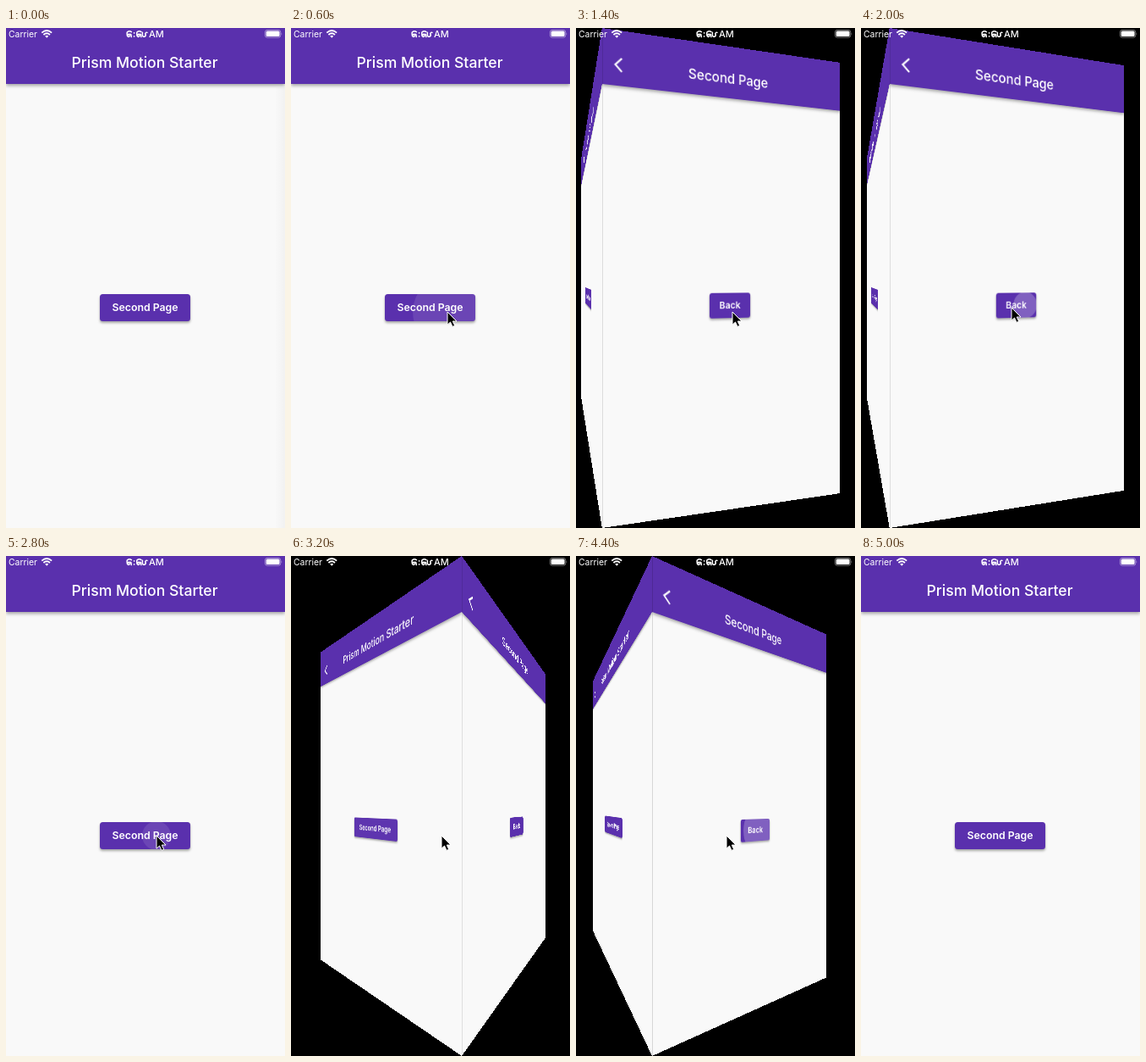
These frames come from a looping animation (330x590 px, 5400 ms). An HTML page:

```html
<!DOCTYPE html>
<html lang="en">
<head>
<meta charset="utf-8">
<title>Page rotation</title>
<style>
html, body { margin: 0; width: 100%; height: 100%; overflow: hidden; background: #000; }
#stage { position: relative; width: 330px; height: 590px; overflow: hidden; background: #000;
  font-family: Inter, Roboto, sans-serif; color: #fff; }
.page { position: absolute; inset: 0; overflow: hidden; background: #f9f9f9; }
#first { transform-origin: 100% 50%; }
#second { transform-origin: 0 50%; }
#second::after { content: ""; position: absolute; inset: 0 auto 0 0; width: 1px; background: rgba(0,0,0,.14); }
.bar { position: absolute; left: 0; top: 0; width: 330px; height: 66px; background: #5a30ad;
  box-shadow: 0 2px 4px rgba(0,0,0,.36); }
.bar span { position: absolute; left: 0; width: 328px; top: 30px; line-height: 22px;
  text-align: center; font-size: 17.6px; font-weight: 500; white-space: nowrap; }
.bar svg { position: absolute; left: 13px; top: 31px; }
.button { position: absolute; top: 313.5px; height: 32px; border-radius: 3.5px; background: #5a30ad;
  box-shadow: 0 2px 3px rgba(0,0,0,.34); overflow: visible; text-align: center;
  font-size: 12.3px; font-weight: 600; line-height: 31.5px; white-space: nowrap; }
.clip { position: absolute; inset: 0; border-radius: inherit; overflow: hidden; }
.ripple { position: absolute; border-radius: 50%; background: #fff; transform: translate(-50%, -50%); }
#first .button { left: 111px; width: 107px; }
#second .button { left: 137px; width: 56.5px; }
#edge { position: absolute; right: 0; top: 70px; bottom: 0; width: 12px;
  background: linear-gradient(90deg, transparent, rgba(0,0,0,.03)); }
#overlay { position: absolute; left: 0; top: 0; }
</style>
</head>
<body>
<div id="stage">
  <div class="page" id="first">
    <div class="bar"><svg class="chevron" width="14" height="20"><path d="M11 2L3 10L11 18" fill="none" stroke="#fff" stroke-width="2.2"/></svg><span>Prism Motion Starter</span></div>
    <div class="button"><div class="clip"><div class="ripple"></div></div>Second Page</div>
    <div id="edge"></div>
  </div>
  <div class="page" id="second">
    <div class="bar"><svg width="14" height="20"><path d="M11 2L3 10L11 18" fill="none" stroke="#fff" stroke-width="2.2"/></svg><span>Second Page</span></div>
    <div class="button"><div class="clip"><div class="ripple"></div></div>Back</div>
  </div>
  <svg id="overlay" width="330" height="590" fill="#fff" font-family="Inter, Roboto, sans-serif">
    <text x="3" y="11" font-size="10.4">Carrier</text>
    <g fill="none" stroke="#fff" stroke-width="1.9">
      <path d="M42.3 5.6Q48.2 .6 54.1 5.6M44.4 7.9Q48.2 4.8 52 7.9"/>
    </g>
    <path d="M46.2 9.6Q48.2 8 50.2 9.6L48.2 11.7Z"/>
    <g fill="none" stroke="#fff" stroke-width="1.5" stroke-linecap="round">
      <path id="digit" d="M143.2 5.2Q142.6 10.4 145 10.4Q147 10 146.2 7.6Q144.6 6.4 144.2 8.6M146 7.6Q148.6 6.4 148.2 10.6M143.4 4.8Q146 3 148.4 4.6"/>
      <use href="#digit" x="11.6"/>
      <path d="M161.4 5.2V8.6Q162 10.8 164 10.2Q166 9 164.8 6.6Q165.4 4.6 167 5.4"/>
    </g>
    <circle cx="151.6" cy="5.8" r=".9"/><circle cx="151.6" cy="9.8" r=".9"/>
    <text x="169" y="11" font-size="11" font-weight="500">AM</text>
    <rect x="306.4" y="2.4" width="18.4" height="8.8" rx="2.6" fill="none" stroke="#fff" stroke-opacity=".5" stroke-width=".9"/>
    <rect x="307.6" y="3.6" width="16" height="6.4" rx="1.5"/>
    <path d="M325.7 5.4Q327 6.8 325.7 8.2Z" opacity=".6"/>
    <path id="cursor" d="M0 0V15.2L3.5 12L6 17.4L8.7 16.2L6.3 11H11Z" fill="#000" stroke="#fff" stroke-width="1"/>
  </svg>
</div>
<script>
const WIDTH = 330, LOOP = 5400, STEP = 100;
const $ = selector => document.querySelector(selector);
const clamp = (v, lo = 0, hi = 1) => Math.min(hi, Math.max(lo, v));
const first = $('#first'), second = $('#second'), cursor = $('#cursor');

const cycles = [{ open: 600, close: 1955 }, { open: 2900, close: 4280 }];
const openTime = 954, closeTime = 440;

const firstTaps = [{ at: 454, x: 185, y: 335 }, { at: 2754, x: 178, y: 330 }];
const secondTaps = [{ at: 1954, x: 178, y: 330 }, { at: 4275, x: 178, y: 330 }];

// time, x, y of the pointer tip
const pointer = [[100, 285, 335], [300, 185, 335], [1500, 185, 335], [1800, 178, 330], [4800, 178, 330]];

// How far the second page has turned into view, 0 to 1
function turned(t) {
  return cycles.reduce((sum, { open, close }) =>
    sum + 1 - (1 - clamp((t - open) / openTime)) ** 1.3 - clamp((t - close) / closeTime), 0);
}

function pointerAt(t) {
  const i = clamp(pointer.findIndex(key => key[0] > t), 1, pointer.length - 1);
  const [t0, x0, y0] = pointer[i - 1], [t1, x1, y1] = pointer[i];
  const u = clamp((t - t0) / (t1 - t0));
  return [x0 + (x1 - x0) * u, y0 + (y1 - y0) * u];
}

function drawRipple(page, taps, strength, t) {
  const style = page.querySelector('.ripple').style;
  const button = page.querySelector('.button');
  const tap = taps.find(({ at }) => t >= at && t < at + 500);
  style.display = tap ? 'block' : 'none';
  if (!tap) return;
  const age = t - tap.at;
  style.left = tap.x - button.offsetLeft + 'px';
  style.top = tap.y - 313.5 + 'px';
  style.width = style.height = 2 * (6 + 0.24 * age) + 'px';
  style.opacity = strength * clamp((500 - age) / 250);
}

function turnPage(page, shift, angle) {
  page.style.transform = angle
    ? `translateX(${shift}px) perspective(300px) rotateY(${angle}deg)` : 'none';
}

function draw(t) {
  const turn = clamp(turned(t));
  const still = turn < 0.0005, done = turn > 0.9995;
  const hinge = WIDTH * (1 - turn);
  first.style.display = done ? 'none' : 'block';
  second.style.display = still ? 'none' : 'block';
  turnPage(first, hinge - WIDTH, still ? 0 : -89.4 * turn);
  turnPage(second, hinge, done ? 0 : 90 * (1 - turn));
  $('.chevron').style.display = still ? 'none' : 'block';
  $('#edge').style.display = t < 500 ? 'block' : 'none';
  drawRipple(first, firstTaps, 0.1, t);
  drawRipple(second, secondTaps, 0.23, t);
  cursor.style.display = t >= 100 && t < 4800 ? 'block' : 'none';
  cursor.setAttribute('transform', `translate(${pointerAt(t)})`);
}

function tick() {
  draw(Math.floor(performance.now() % LOOP / STEP) * STEP);
  requestAnimationFrame(tick);
}
tick();
</script>
</body>
</html>
```
